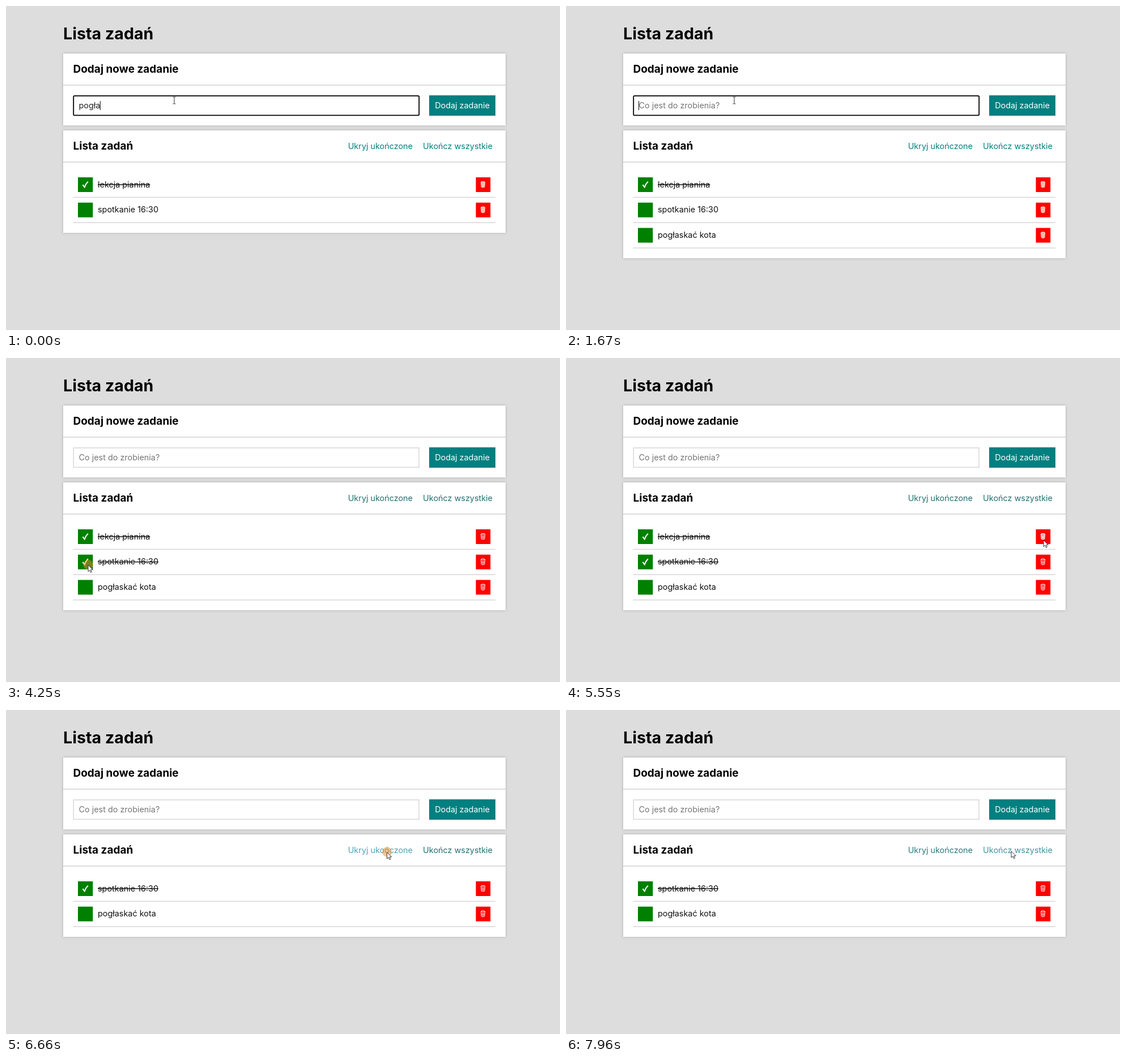
Recreate the animation shown at these times as an HTML page. Size 978 by 573 pixels, loop 8 s.

```html
<!DOCTYPE html>
<html lang="pl">
<head>
<meta charset="utf-8">
<title>Lista zadań</title>
<style>
  html, body { margin: 0; width: 100%; height: 100%; overflow: hidden; background: #ddd; }
  svg { display: block; width: 978px; height: 573px; }
  text { font: 400 14.4px Inter, sans-serif; font-optical-sizing: none; white-space: pre; }
  .h1 { font-size: 28.6px; font-weight: 700; }
  .h2 { font-size: 19px; font-weight: 700; }
  .end { text-anchor: end; }
  .panel { fill: #fff; filter: drop-shadow(0 0 2.2px #aaa); }
  .rule { stroke: #ddd; stroke-width: 1.8; }
  .done { text-decoration: line-through; }
</style>
</head>
<body>
<svg id="stage" viewBox="0 0 978 573">
  <rect width="978" height="573" fill="#ddd"/>
  <text class="h1" x="101" y="59">Lista zadań</text>

  <rect class="panel" x="101" y="84" width="781" height="127.3"/>
  <text class="h2" x="118.5" y="118">Dodaj nowe zadanie</text>
  <path class="rule" d="M101 140H882"/>
  <rect id="field" fill="#fff"/>
  <text id="entry" x="128.5" y="180.5"></text>
  <rect id="caret" y="168" width="1" height="16"/>
  <rect x="747" y="158" width="117" height="36" fill="teal"/>
  <text x="805.5" y="180.5" fill="#fff" text-anchor="middle">Dodaj zadanie</text>

  <rect id="list" class="panel" x="101" y="220" width="781"/>
  <text class="h2" x="118.5" y="254">Lista zadań</text>
  <text id="toggle" class="end" x="718" y="252.5"></text>
  <text id="finish" class="end" x="859" y="252.5">Ukończ wszystkie</text>
  <path class="rule" d="M101 276H882"/>
  <g id="rows"></g>

  <circle id="ring" fill="#f08a24"/>
  <path id="beam" d="M-2.5 -6H-.8L0 -5.3L.8 -6H2.5M0 -5.3V5.3M-2.5 6H-.8L0 5.3L.8 6H2.5" fill="none" stroke="#333"/>
  <path id="arrow" d="M0 0V11.6L2.7 9.1L4.5 13.2L6.4 12.4L4.7 8.4H8.3Z" fill="#fff" stroke="#222" stroke-width=".9" stroke-linejoin="round"/>
</svg>
<script>
const LOOP = 8000, ROW = 44.75;
const $ = id => document.getElementById(id);
const set = (el, attrs) => { for (const k in attrs) el.setAttribute(k, attrs[k]); };
const show = (el, on) => el.setAttribute('visibility', on ? 'visible' : 'hidden');
const clamp = v => Math.max(0, Math.min(1, v));
const ease = v => v * v * (3 - 2 * v);

const PHRASE = 'pogłaskać kota';
const KEYS = [50, 170, 300, 560, 690, 820, 950, 1210, 1340];
const SUBMIT = 1670, BLUR = 3780, CHECK = 4250, REMOVE = 5790, HIDE = 6700, UNHIDE = 7610;

// Pointer stops: time, x, y
const PATH = [
  [0, 297, 167], [2400, 297, 167], [3020, 130, 371], [3180, 135, 355],
  [3250, 147, 362], [3780, 147, 362], [3980, 145, 366], [4620, 145, 366],
  [5270, 852, 292], [5400, 844, 319], [5550, 843, 322], [5880, 843, 322],
  [6190, 667, 227], [6290, 670, 243], [6440, 672.5, 251.5], [6900, 672.5, 251.5],
  [7060, 680, 253], [7290, 680, 253], [7410, 687.5, 253], [7650, 687.5, 253],
  [7960, 786, 249.5], [8000, 786, 249.5]
];
// Clicks: press, release
const CLICKS = [[3780, CHECK], [5620, REMOVE], [6520, HIDE], [7440, UNHIDE]];

function pointer(t) {
  const i = PATH.findIndex(p => p[0] > t);
  const [t0, x0, y0] = PATH[i - 1], [t1, x1, y1] = PATH[i];
  const k = ease((t - t0) / (t1 - t0));
  return [x0 + (x1 - x0) * k, y0 + (y1 - y0) * k];
}

function makeRow(i) {
  const g = document.createElementNS('http://www.w3.org/2000/svg', 'g');
  g.setAttribute('transform', `translate(0 ${303 + i * ROW})`);
  g.innerHTML = `
    <rect x="127" width="26.3" height="26" fill="green"/>
    <path class="tick" d="M135.4 13.2L138.7 17.4Q140.6 11.5 144.8 7.4" fill="none" stroke="#fff" stroke-width="2.1"/>
    <text x="162" y="17.6" fill="#111"></text>
    <rect x="829.5" width="25.7" height="26" fill="red"/>
    <g class="bin" stroke-width="1">
      <path d="M838.4 8.2Q842 6 845.6 8.2L844.8 17.2Q842 18.8 839.2 17.2Z"/>
      <path d="M838.4 8.4Q842 10.4 845.6 8.4M840.6 11V16M842 11.3V16.3M843.4 11V16" stroke-width=".7"/>
    </g>
    <path class="rule" d="M118.5 35.4H864"/>`;
  $('rows').append(g);
  return {
    g, label: g.querySelector('text'),
    tick: g.querySelector('.tick'), bin: g.querySelector('.bin')
  };
}
const rows = [0, 1, 2].map(makeRow);

function drawForm(t) {
  const focused = t < BLUR, sent = t >= SUBMIT;
  set($('field'), focused
    ? { x: 119.2, y: 158.9, width: 610, height: 34.5, rx: 1.8, stroke: '#000', 'stroke-width': 1.8 }
    : { x: 119.2, y: 158.9, width: 609.8, height: 34.5, rx: 0, stroke: '#d8d8d8', 'stroke-width': 1.5 });
  const typed = PHRASE.slice(0, 5 + KEYS.filter(k => t >= k).length);
  const entry = $('entry');
  entry.textContent = sent ? 'Co jest do zrobienia?' : typed;
  set(entry, { fill: sent ? '#757575' : '#222' });
  set($('caret'), { x: sent ? 128 : 128 + entry.getComputedTextLength() });
  const lit = t < 1870 || (t >= 2400 && t < 2920) || t >= 3440;
  show($('caret'), focused && lit);
}

function drawList(t, x, y) {
  const hiding = t >= HIDE && t < UNHIDE;
  const items = [
    { name: 'lekcja pianina', done: true, live: t < REMOVE },
    { name: 'spotkanie 16:30', done: t >= CHECK, live: true },
    { name: PHRASE, done: false, live: t >= SUBMIT }
  ].filter(it => it.live && !(hiding && it.done));

  set($('list'), { height: 91.8 + ROW * items.length });
  rows.forEach((row, i) => {
    const it = items[i];
    row.g.setAttribute('display', it ? 'inline' : 'none');
    if (!it) return;
    row.label.textContent = it.name;
    row.label.setAttribute('class', it.done ? 'done' : '');
    row.tick.setAttribute('display', it.done ? 'inline' : 'none');
    const top = 303 + i * ROW;
    const hover = x > 829 && x < 855 && y > top && y < top + 26;
    set(row.bin, t < BLUR
      ? { fill: '#f3b49b', stroke: '#f8d3bd' }
      : { fill: hover ? '#ff8c8c' : '#ff3030', stroke: hover ? '#fff' : '#ffe4e0' });
  });

  $('toggle').textContent = (hiding ? 'Pokaż' : 'Ukryj') + ' ukończone';
  const base = t < BLUR ? [0, 128, 128] : [34, 112, 112], bright = [78, 163, 184];
  const tint = (from, to) => {
    const k = clamp((t - from) / 250) * (1 - clamp((t - to) / 250));
    return `rgb(${base.map((c, i) => Math.round(c + (bright[i] - c) * k))})`;
  };
  set($('toggle'), { fill: tint(6260, 7760) });
  set($('finish'), { fill: tint(7790, LOOP + 500) });
}

function drawPointer(t, x, y) {
  const inField = t < BLUR && y < 194;
  show($('beam'), inField);
  show($('arrow'), !inField);
  set($(inField ? 'beam' : 'arrow'), { transform: `translate(${x} ${y})` });

  const click = CLICKS.find(([down, up]) => t >= down && t < up + 200);
  show($('ring'), click);
  if (!click) return;
  const grow = clamp((t - click[0]) / 140), fade = clamp((t - click[1]) / 200);
  set($('ring'), { cx: x, cy: y - .5, r: 8.5 * ease(grow) + fade, opacity: .5 * (1 - fade) });
}

function draw(t) {
  const [x, y] = pointer(t);
  drawForm(t);
  drawList(t, x, y);
  drawPointer(t, x, y);
}

const start = performance.now();
function tick() {
  draw((performance.now() - start) % LOOP);
  requestAnimationFrame(tick);
}
tick();
</script>
</body>
</html>
```
